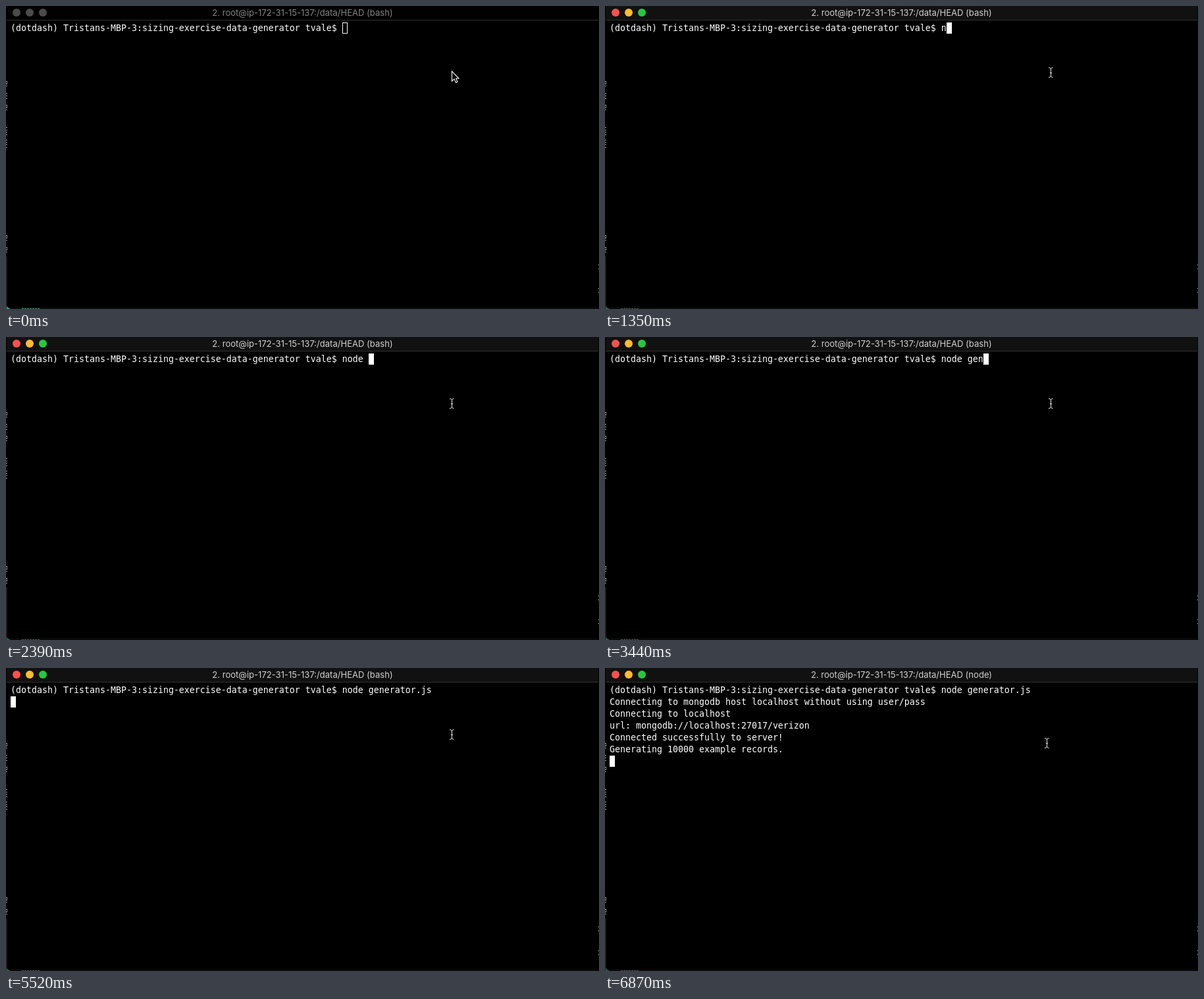
An HTML page with a canvas for the animation above (8 s loop, 901 by 460 pixels).

```html
<!DOCTYPE html>
<html lang="en">
<head>
<meta charset="utf-8">
<title>Terminal</title>
<style>
  html, body { margin: 0; width: 100%; height: 100%; overflow: hidden; background: #000; }
  canvas { display: block; width: 901px; height: 460px; }
</style>
</head>
<body>
<canvas id="stage" width="901" height="460"></canvas>
<script>
const ctx = document.getElementById('stage').getContext('2d');
const LOOP = 8000;
const LEFT = 7, TOP = 25, CELL = 8, LINE = 18;
const MONO = '13.29px "DejaVu Sans Mono", monospace';
const SANS = '13.05px Inter, sans-serif';

const PROMPT = '(dotdash) Tristans-MBP-3:sizing-exercise-data-generator tvale$ ';
const COMMAND = 'node generator.js ';
const OUTPUT = [
  'Connecting to mongodb host localhost without using user/pass',
  'Connecting to localhost',
  'url: mongodb://localhost:27017/verizon',
  'Connected successfully to server!',
  'Generating 10000 example records.'
];

const FOCUS = 900, ENTER = 5520, RUN = 6270;

// [time, characters typed]
const TYPING = [
  [0, 0], [1350, 1], [1800, 0], [1950, 2], [2100, 3], [2240, 4], [2390, 5],
  [3140, 6], [3290, 7], [3440, 8], [3580, 10], [3880, 18]
];
// [time, x, y] of the text pointer
const POINTER = [[0, 674, 93], [6420, 669, 102], [6570, 668, 105], [6870, 668, 106]];

const latest = (steps, t) => steps.filter(s => s[0] <= t).pop();

function rect(x, y, w, h, color) {
  ctx.fillStyle = color;
  ctx.fillRect(x, y, w, h);
}

function text(str, x, y, font, color, align = 'left') {
  ctx.font = font;
  ctx.fillStyle = color;
  ctx.textAlign = align;
  ctx.fillText(str, x, y);
}

function titleBar(focused, task) {
  rect(1, 0, 899, 21, focused ? '#111' : '#010101');
  rect(1, 21, 899, 1, '#303030');
  ['#fc504b', '#fdbb2e', '#27c840'].forEach((color, i) => {
    ctx.fillStyle = focused ? color : '#4b4b4b';
    ctx.beginPath();
    ctx.arc(16 + i * 20, 10, 6, 0, Math.PI * 2);
    ctx.fill();
  });
  text(`2. root@ip-172-31-15-137:/data/HEAD (${task})`, 450.5, 15, SANS,
    focused ? '#d2d2d2' : '#858585', 'center');
}

// Slivers of the windows behind this one
function backdrop(focused) {
  for (const y of [114, 150, 348, 366]) {
    for (const dy of [0, 4, 7]) rect(0, y + dy, 2, 1, '#a0a0a0');
    rect(1, y + 1, 1, 3, '#808080');
  }
  for (const dy of [0, 4, 8]) rect(0, 132 + dy, 2, 1, '#a0a0a0');
  for (const y of [184, 203]) {
    for (const dy of [0, 4, 7, 11]) rect(0, y + dy, 2, 1, '#a0a0a0');
  }
  for (const y of [392, 428]) {
    rect(900, y, 1, 2, '#777');
    rect(900, y + 6, 1, 2, '#777');
  }
  rect(0, 380, 1, 80, '#242424');
  rect(1, 380, 1, 76, '#151515');
  rect(6, 458, 894, 1, focused ? '#141414' : '#181818');
  ctx.fillStyle = focused ? '#2c6253' : '#35a184';
  ctx.beginPath();
  ctx.moveTo(1, 455);
  ctx.quadraticCurveTo(2, 458, 6, 459);
  ctx.lineTo(6, 460);
  ctx.lineTo(1, 460);
  ctx.fill();
  for (let x = 24; x < 50; x += 4) rect(x, 459, 3, 1, focused ? '#405a52' : '#3f9c83');
}

function caret(col, row, focused) {
  const x = LEFT + col * CELL, y = TOP + row * LINE;
  if (focused) {
    rect(x, y, CELL, 17, '#fff');
  } else {
    ctx.strokeStyle = '#fff';
    ctx.lineWidth = 1;
    ctx.strokeRect(x + 0.5, y + 0.5, CELL - 1, 16);
  }
}

function arrow(x, y) {
  ctx.beginPath();
  for (const [dx, dy] of [[0, 0], [0, 15], [3.5, 11.8], [6, 17.3], [8.5, 16.2], [6.2, 11], [10.5, 11]]) {
    ctx.lineTo(x + dx, y + dy);
  }
  ctx.closePath();
  ctx.fillStyle = '#000';
  ctx.fill();
  ctx.strokeStyle = '#fff';
  ctx.lineWidth = 1.1;
  ctx.stroke();
}

function beam(x, y) {
  ctx.strokeStyle = '#e4e4e4';
  ctx.lineWidth = 1;
  ctx.beginPath();
  for (const [end, bend] of [[0.5, 3], [15.5, 13]]) {
    for (const side of [0, 6.5]) {
      ctx.moveTo(x + side, y + end);
      ctx.quadraticCurveTo(x + 3.5, y + end, x + 3.5, y + bend);
    }
  }
  ctx.moveTo(x + 3.5, y + 3);
  ctx.lineTo(x + 3.5, y + 13);
  ctx.moveTo(x + 2, y + 8.5);
  ctx.lineTo(x + 5, y + 8.5);
  ctx.stroke();
}

function draw(t) {
  const focused = t >= FOCUS;
  const lines = [PROMPT + COMMAND.slice(0, latest(TYPING, t)[1])];
  if (t >= RUN) lines.push(...OUTPUT);

  rect(0, 0, 901, 460, '#000');
  backdrop(focused);
  titleBar(focused, t >= RUN ? 'node' : 'bash');
  lines.forEach((line, i) => text(line, LEFT, TOP + 13 + i * LINE, MONO, '#fff'));

  if (t >= ENTER) caret(0, lines.length, focused);
  else caret(lines[0].length, 0, focused);

  const [, x, y] = latest(POINTER, t);
  if (focused) beam(x, y);
  else arrow(677.5, 99);
}

function tick() {
  draw(performance.now() % LOOP);
  requestAnimationFrame(tick);
}
tick();
</script>
</body>
</html>
```
